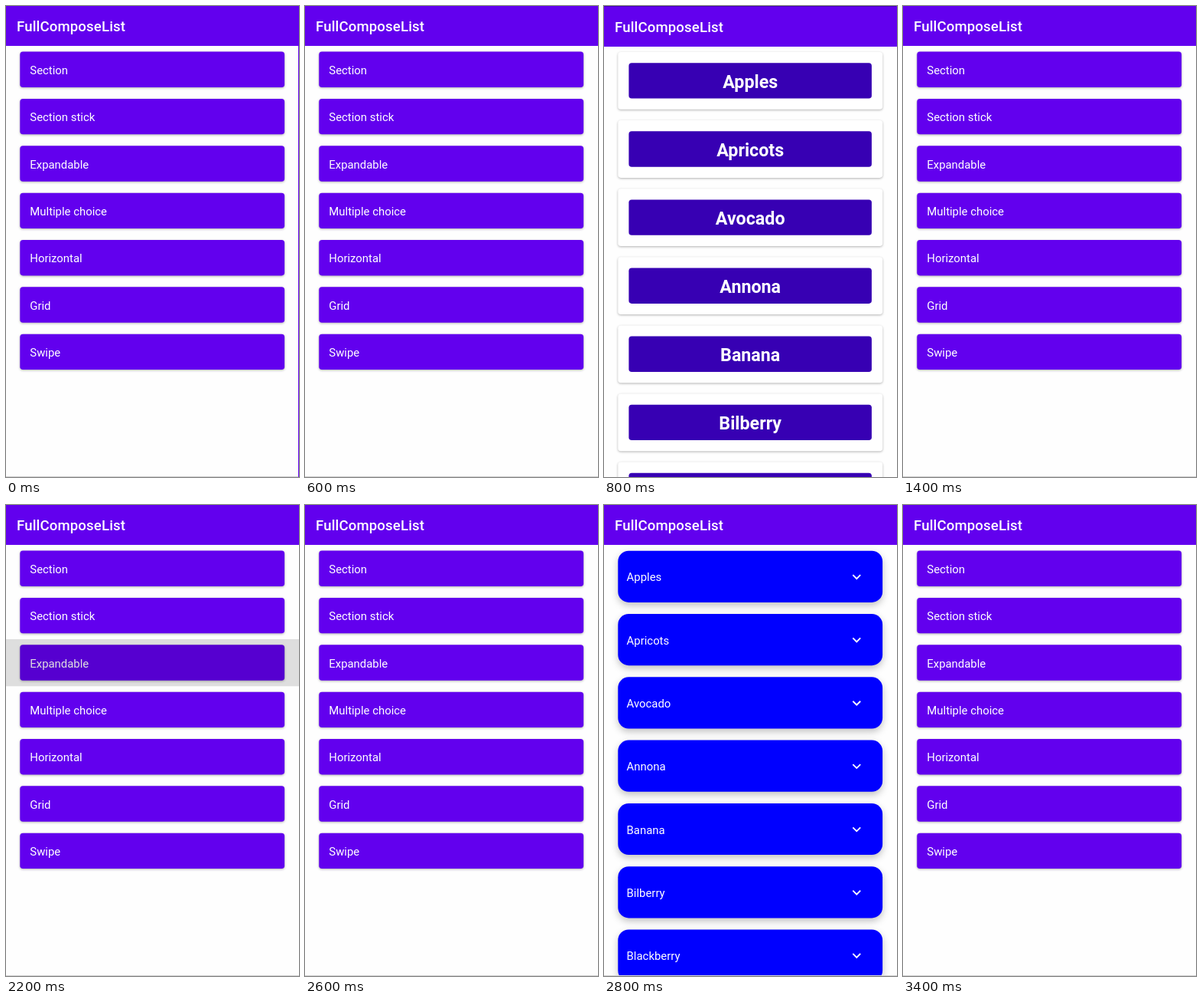
An HTML page for the animation above (4.2 s loop, 383 px wide and 614 px high).

```html
<!DOCTYPE html>
<html lang="en">
<head>
<meta charset="utf-8">
<title>FullComposeList</title>
<style>
  html, body { margin: 0; width: 100%; height: 100%; overflow: hidden; background: #fefefe; }
  svg { display: block; width: 383px; height: 614px; }
  text { font-family: Roboto, sans-serif; font-size: 14.9px; fill: #fff; }
  .title { font-size: 18.6px; font-weight: 500; letter-spacing: .14px; }
  .big { font-size: 23.25px; font-weight: 700; text-anchor: middle; }
  .low { filter: drop-shadow(0 1px 1.4px rgba(0, 0, 0, .3)); }
  .mid { filter: drop-shadow(0 1.5px 1.7px rgba(0, 0, 0, .3)); }
  .high { filter: drop-shadow(0 4px 5px rgba(0, 0, 0, .24)); }
</style>
</head>
<body>
<svg id="stage" viewBox="0 0 383 614"></svg>
<script>
const stage = document.getElementById('stage');
const PURPLE = '#6200ee';
const fruits = ['Apples', 'Apricots', 'Avocado', 'Annona', 'Banana', 'Bilberry', 'Blackberry'];
const menuItems = ['Section', 'Section stick', 'Expandable', 'Multiple choice', 'Horizontal', 'Grid', 'Swipe'];
const MENU_STEP = 61.35;

function add(parent, tag, attrs = {}, label) {
  const el = document.createElementNS('http://www.w3.org/2000/svg', tag);
  for (const key in attrs) el.setAttribute(key, attrs[key]);
  if (label) el.textContent = label;
  parent.appendChild(el);
  return el;
}

function rect(parent, x, y, width, height, fill, more) {
  return add(parent, 'rect', { x, y, width, height, fill, ...more });
}

function screen(barHeight, baseline) {
  const g = add(stage, 'g');
  rect(g, 0, 0, 383, 614, '#fefefe');
  rect(g, 0, 0, 383, barHeight, PURPLE);
  add(g, 'text', { x: 14, y: baseline, class: 'title' }, 'FullComposeList');
  return g;
}

function bottomLine(g) {
  rect(g, 0, 613, 383, 1, '#d2d2d2');
}

const menu = screen(52, 33);
menuItems.forEach((name, i) => {
  const y = 59.6 + i * MENU_STEP;
  rect(menu, 18.3, y, 345.8, 46.4, PURPLE, { rx: 3.8, class: 'low' });
  add(menu, 'text', { x: 31.3, y: y + 29.3 }, name);
});
bottomLine(menu);
const press = rect(menu, 0, 0, 383, MENU_STEP, '#000', { 'fill-opacity': .125 });
const edge = rect(menu, 382, 51, 1, 563, PURPLE);

const swipe = screen(53, 34);
rect(swipe, 0, 0, 382, 1, '#4300b4');
fruits.forEach((name, i) => {
  const y = 60 + i * 89.1;
  rect(swipe, 18.3, y, 345.8, 74.8, '#fff', { rx: 3.8, class: 'mid' });
  rect(swipe, 32.4, y + 14.2, 317.5, 46.4, '#3700b3', { rx: 3.8 });
  add(swipe, 'text', { x: 191.2, y: y + 46.8, class: 'big' }, name);
});

const expand = screen(52, 33);
fruits.forEach((name, i) => {
  const y = 59.7 + i * 82.3;
  rect(expand, 18.3, y, 345.8, 67.2, '#00f', { rx: 14, class: 'high' });
  add(expand, 'text', { x: 29.6, y: y + 39.6 }, name);
  add(expand, 'path', {
    d: 'M16.59 8.59 12 13.17 7.41 8.59 6 10l6 6 6-6z',
    transform: `translate(319.1 ${y + 22.8}) scale(.93)`,
    fill: '#fff'
  });
});
bottomLine(expand);

// start time, visible screen, pressed row
const steps = [
  [0, menu], [200, menu, 6], [600, menu], [800, swipe], [1400, menu],
  [2200, menu, 2], [2600, menu], [2800, expand], [3400, menu]
];
const LOOP = 4200;
const start = performance.now();

function show(el, on) {
  el.style.display = on ? '' : 'none';
}

function draw() {
  const t = Math.max(0, performance.now() - start) % LOOP;
  const [, view, row] = steps.filter(s => s[0] <= t).pop();
  [menu, swipe, expand].forEach(g => show(g, g === view));
  show(press, row !== undefined);
  if (row !== undefined) press.setAttribute('y', 52.2 + row * MENU_STEP);
  show(edge, t < 200);
  requestAnimationFrame(draw);
}
draw();
</script>
</body>
</html>
```
